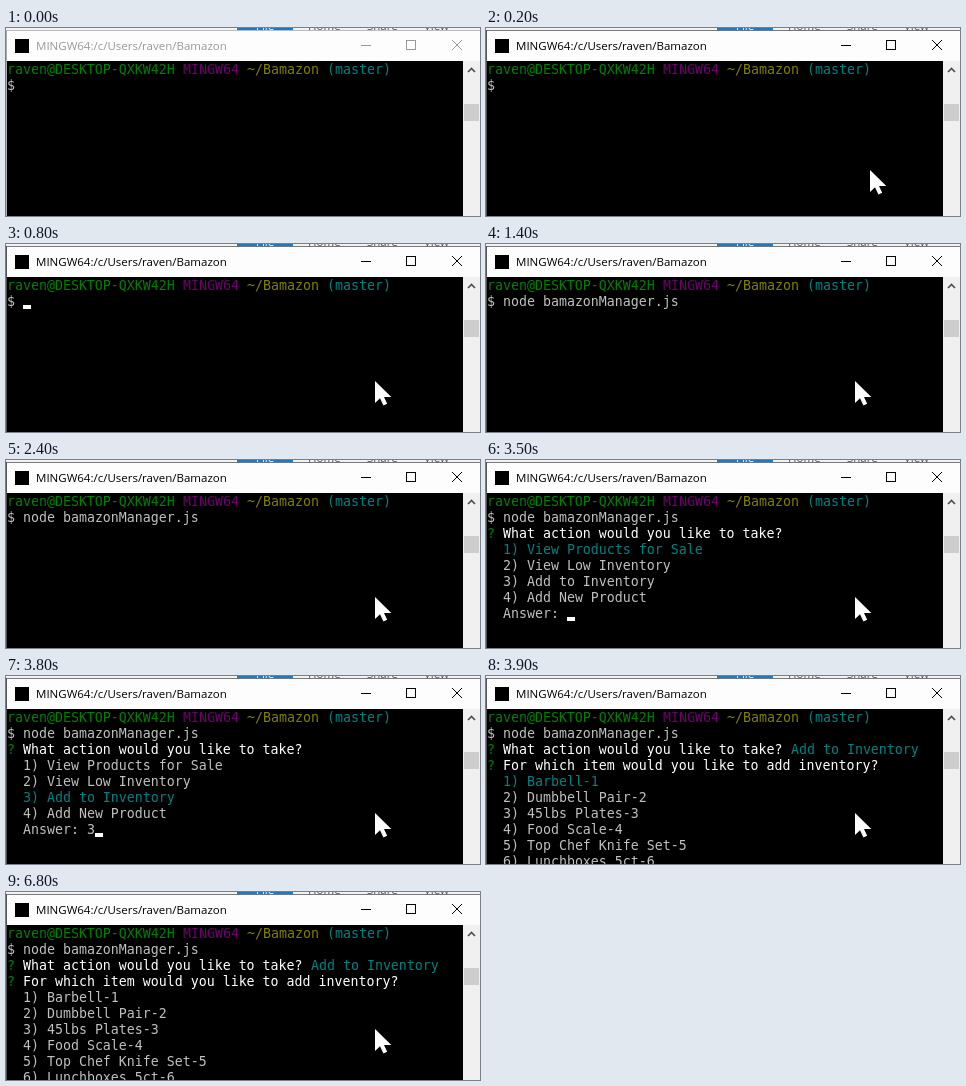
Animation, 474 px wide and 188 px high, one loop 8 s. Source, as an HTML page:

```html
<!DOCTYPE html>
<html lang="en">
<head>
<meta charset="utf-8">
<title>Terminal session</title>
<style>
  html, body { margin: 0; width: 100%; height: 100%; overflow: hidden; background: #000; }
  svg { display: block; width: 474px; height: 188px; }
  text { white-space: pre; }
  .ui { font: 11.5px "Open Sans", "Noto Sans", sans-serif; }
  #screen { font: 13.289px "DejaVu Sans Mono", "Liberation Mono", monospace; }
  #bar { fill: #999; stroke: #999; }
  #bar.active { fill: #000; stroke: #000; }
  #bar text { stroke: none; }
  #bar path { fill: none; }
</style>
</head>
<body>
<svg viewBox="0 0 474 188">
  <g class="ui" fill="#555">
    <rect width="474" height="3" fill="#f3f3f5"/>
    <rect x="231" width="56" height="3" fill="#1979ca"/>
    <text x="250" y="2" fill="#fff">File</text>
    <text x="302" y="2">Home</text>
    <text x="361" y="2">Share</text>
    <text x="418" y="2">View</text>
  </g>
  <rect y="2" width="474" height="31" fill="#fdfdfd"/>
  <rect id="edge" y="2" width="474" height="1"/>
  <rect y="33" width="474" height="155"/>
  <rect id="side" y="2" width="1" height="186"/>
  <rect x="9" y="11" width="14" height="14"/>
  <g id="bar" class="ui">
    <text x="30" y="22">MINGW64:/c/Users/raven/Bamazon</text>
    <path shape-rendering="crispEdges" d="M355 17.5h10M400.5 12.5h9v9h-9z"/>
    <path d="M446 12l10 10m0-10l-10 10"/>
  </g>
  <g id="screen"></g>
  <rect id="cursor" width="8" height="4" fill="#fff"/>
  <rect x="457" y="33" width="17" height="155" fill="#f0f0f0"/>
  <path d="M462 44l3.5-3.5 3.5 3.5" fill="none" stroke="#505050" stroke-width="1.7"/>
  <rect x="458" y="76" width="15" height="17" fill="#cdcdcd"/>
  <path id="mouse" d="M0 0V22L5 17.3L8.4 24.5L12.2 22.8L9 15.9H16.3Z" fill="#fff"/>
</svg>
<script>
const LOOP = 8000;
const $ = id => document.getElementById(id);
const GREEN = '#008000', PURPLE = '#6c006c', OLIVE = '#808000', TEAL = '#008080',
      GREY = '#c0c0c0', WHITE = '#fff';
const LAUNCH = 1200, MENU = 2800, PICK = 3800, ITEMS = 3900, NEXT = 6800;
const parts = [];

function write(col, row, words, fill, from = 0, to = LOOP) {
  const node = document.createElementNS('http://www.w3.org/2000/svg', 'text');
  node.setAttribute('x', 1 + col * 8);
  node.setAttribute('y', 46 + row * 16);
  node.setAttribute('fill', fill);
  node.textContent = words;
  $('screen').append(node);
  parts.push({ node, from, to });
}

write(0, 0, 'raven@DESKTOP-QXKW42H', GREEN);
write(22, 0, 'MINGW64', PURPLE);
write(30, 0, '~/Bamazon', OLIVE);
write(40, 0, '(master)', TEAL);
write(0, 1, '$', GREY);
write(2, 1, 'node bamazonManager.js', GREY, LAUNCH);

write(0, 2, '?', GREEN, MENU);
write(2, 2, 'What action would you like to take?', WHITE, MENU);
['View Products for Sale', 'View Low Inventory', 'Add to Inventory', 'Add New Product'].forEach((name, i) => {
  const line = `${i + 1}) ${name}`;
  write(2, 3 + i, line, i === 0 ? TEAL : GREY, MENU, PICK);
  write(2, 3 + i, line, i === 2 ? TEAL : GREY, PICK, ITEMS);
});
write(2, 7, 'Answer:', GREY, MENU, ITEMS);
write(10, 7, '3', GREY, PICK, ITEMS);

write(38, 2, 'Add to Inventory', TEAL, ITEMS);
write(0, 3, '?', GREEN, ITEMS);
write(2, 3, 'For which item would you like to add inventory?', WHITE, ITEMS);
['Barbell', 'Dumbbell Pair', '45lbs Plates', 'Food Scale', 'Top Chef Knife Set', 'Lunchboxes 5ct'].forEach((name, i) => {
  const line = `${i + 1}) ${name}-${i + 1}`;
  write(2, 4 + i, line, i === 0 ? TEAL : GREY, ITEMS, NEXT);
  write(2, 4 + i, line, GREY, NEXT);
});

// Each entry: start time, then column and row (or x and y); no place means hidden.
const cursorSteps = [[0], [800, 2, 1], [LAUNCH, 24, 1], [1400], [1900, 24, 1], [2200, 0, 2], [2400],
                     [MENU, 10, 7], [2900], [3500, 10, 7], [PICK, 11, 7], [ITEMS]];
const mouseSteps = [[0], [100, 430, 163], [200, 384, 142], [300, 369, 137]];

function place(node, steps, t, toPoint) {
  const [, ...spot] = steps.findLast(step => step[0] <= t);
  node.style.display = spot.length ? '' : 'none';
  if (spot.length) node.setAttribute('transform', `translate(${toPoint(...spot)})`);
}

function draw(now) {
  const t = now % LOOP;
  const active = t >= 100;
  $('bar').classList.toggle('active', active);
  $('edge').setAttribute('fill', active ? '#777' : '#bbb');
  $('side').setAttribute('fill', active ? '#555' : '#aaa');
  for (const { node, from, to } of parts) node.style.display = t >= from && t < to ? '' : 'none';
  place($('cursor'), cursorSteps, t, (col, row) => [1 + col * 8, 45 + row * 16]);
  place($('mouse'), mouseSteps, t, (x, y) => [x, y]);
}

let start;
function tick(now) {
  start ??= now;
  draw(now - start);
  requestAnimationFrame(tick);
}
draw(0);
requestAnimationFrame(tick);
</script>
</body>
</html>
```
